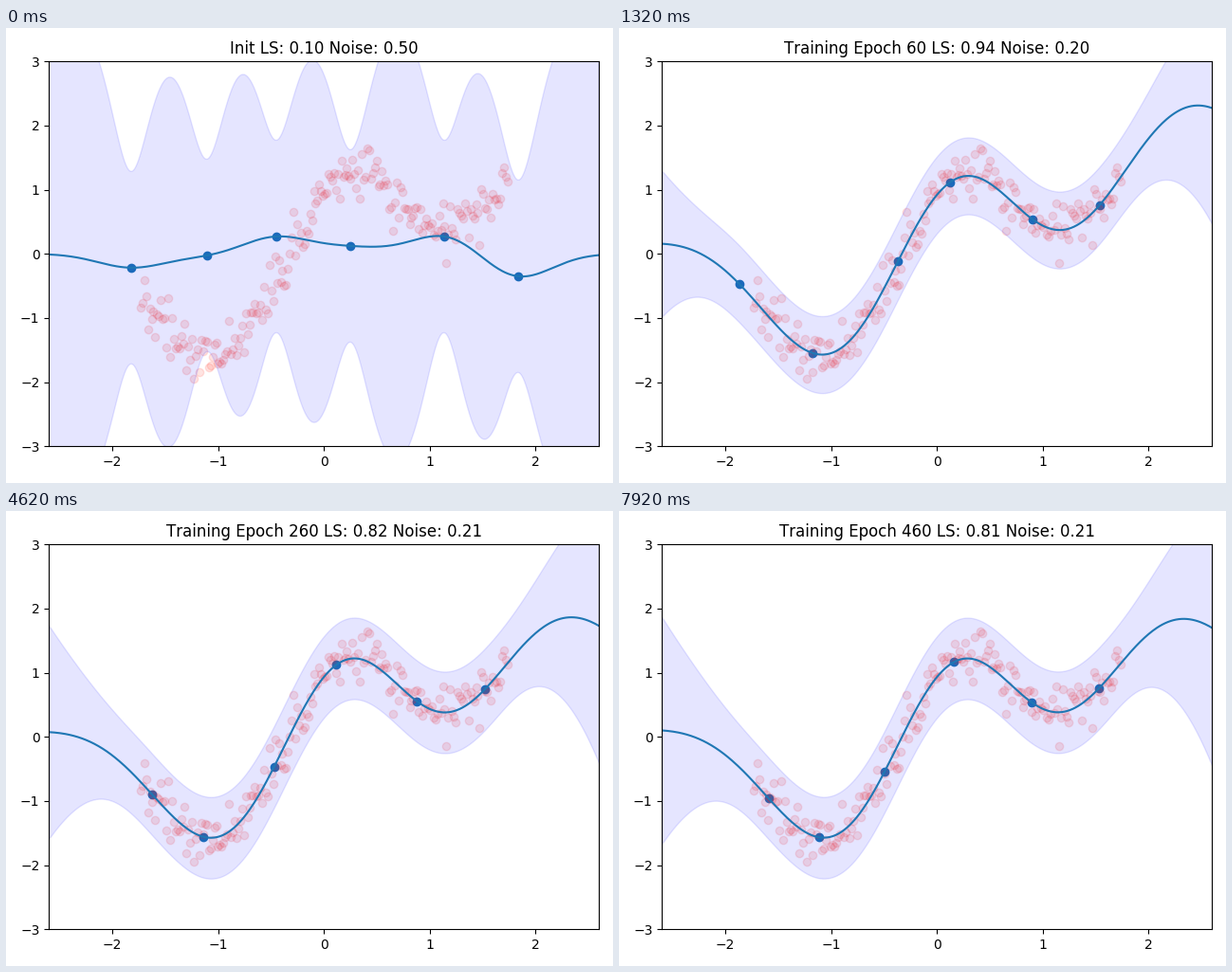
These frames come from a looping animation (640 by 480 pixels, 8 s). A matplotlib script:

```python
import numpy as np
import matplotlib.pyplot as plt
from matplotlib.animation import FuncAnimation

LOOP, STEP, HOLD = 8000, 40, 330
W, H = 640, 480
EDGE = 1.5 * np.sqrt(3)
N = 200
PRIOR = 1.4

# training stages, and at each: six inducing points, then the mean
# and the band's half width at the left and right edge
KEY_AT = [0, 2, 4, 8, 24]
KEYS = np.array([
    [-1.820, -1.104, -0.450, 0.249, 1.136, 1.835, 0.00, -0.02, 1.65, 1.45],
    [-1.955, -1.417, -0.342, 0.500, 1.387, 2.059, 0.40, 1.31, 1.65, 1.45],
    [-1.865, -1.175, -0.369, 0.124, 0.903, 1.539, 0.16, 2.27, 1.14, 1.81],
    [-1.704, -1.202, -0.414, 0.025, 0.840, 1.512, 0.02, 1.80, 1.44, 2.13],
    [-1.588, -1.113, -0.495, 0.160, 0.894, 1.530, 0.10, 1.70, 1.77, 2.15],
])
INIT_Y = [-0.217, -0.025, 0.270, 0.123, 0.270, -0.350]
EARLY_Y = [-0.468, -1.325, 0.049, 1.009, 0.610, 1.157]
FINAL_Y = [-0.970, -1.562, -0.543, 1.156, 0.551, 0.743]

xs = np.linspace(-EDGE, EDGE, 400)


def kernel(a, b, scale):
    return np.exp(-np.subtract.outer(a, b) ** 2 / (2 * scale))


def fit(z, y, ends, scale):
    """Smooth curve on the kernels at z through the dots and both ends."""
    at = np.concatenate([[-EDGE], z, [EDGE]])
    goal = np.concatenate([ends[:1], y, ends[1:]])
    w = np.linalg.lstsq(kernel(at, z, scale), goal, rcond=None)[0]
    return lambda x: kernel(x, z, scale) @ w


trend = fit(KEYS[-1, :6], FINAL_Y, KEYS[-1, 6:8], 0.81)
lifts = np.array([INIT_Y - trend(KEYS[0, :6]),
                  EARLY_Y - trend(KEYS[1, :6]),
                  np.zeros(6)])


def blend(pos, at, rows):
    return np.array([np.interp(pos, at, col) for col in rows.T])


def length_scale(stage):
    if stage < 4:
        return [0.10, 0.11, 0.69, 0.88][stage]
    return 0.809 + 0.131 * np.exp((4 - stage) / 4.5)


def noise_level(stage):
    return [0.50, 0.55, 0.30, 0.23, 0.20, 0.212][min(stage, 5)]


def progress(stage):
    """Slow first step, later a decaying approach to the last key."""
    if stage == 1:
        return 0.25
    if stage <= 8:
        return stage
    return 8 + 16 * (1 - np.exp((8 - stage) / 6)) / (1 - np.exp(-16 / 6))


def half_width(z, widths, scale, noise, trained):
    kx = kernel(xs, z, scale)
    solved = np.linalg.solve(kernel(z, z, scale), kx.T).T
    prior = PRIOR * np.maximum(1 - np.sum(kx * solved, axis=1), 0)
    left = np.clip((z[0] - xs) / (z[0] + EDGE), 0, 1)
    right = np.clip((xs - z[-1]) / (EDGE - z[-1]), 0, 1)
    ends = (widths / 3) ** 2 - noise ** 2
    tails = ends[0] * left ** 3.3 + ends[1] * right ** 3.3
    extra = (1 - trained) * prior + trained * tails
    return 3 * np.sqrt(np.maximum(noise ** 2 + extra, 0))


plt.rcParams["text.kerning_factor"] = 6
fig, ax = plt.subplots(figsize=(W / 100, H / 100), dpi=100)
fig.subplots_adjust(left=45.2 / W, right=625.2 / W,
                    bottom=1 - 441.2 / H, top=1 - 35.2 / H)
title = ax.set_title("")

rng = np.random.default_rng(4)
data_x = np.linspace(-np.sqrt(3), np.sqrt(3), N)
data_y = trend(data_x) + 0.21 * rng.standard_normal(N).clip(-2.5, 2.5)

dots = ax.scatter(np.zeros(6), np.zeros(6), color="C0")
ax.scatter(data_x, data_y, color="#ff2818", alpha=0.12)
band = ax.fill_between(xs, -xs ** 0, xs ** 0, color="b", alpha=0.1)
line, = ax.plot(xs, 0 * xs, color="C0")
ax.set_xlim(-EDGE, EDGE)
ax.set_ylim(-3, 3)


def update(frame):
    stage = (frame * STEP + STEP - 1) // HOLD
    pos = progress(stage)
    scale, noise = length_scale(stage), noise_level(stage)
    key = blend(pos, KEY_AT, KEYS)
    z = key[:6]
    curve = fit(z, trend(z) + blend(pos, KEY_AT[:3], lifts), key[6:8], scale)
    mean = curve(xs)
    half = half_width(z, key[8:], scale, noise, min(1, pos / 2))

    dots.set_offsets(np.column_stack([z, curve(z)]))
    line.set_ydata(mean)
    upper = np.column_stack([xs, mean + half])
    lower = np.column_stack([xs, mean - half])
    band.set_verts([np.vstack([upper, lower[::-1]])])
    head = f"Training Epoch {20 * (stage - 1)}" if stage else "Init"
    title.set_text(f"{head} LS: {scale:.2f} Noise: {noise:.2f}")
    return dots, line, band, title


anim = FuncAnimation(fig, update, frames=LOOP // STEP, interval=STEP,
                     repeat=True, repeat_delay=0)
plt.show()
```
